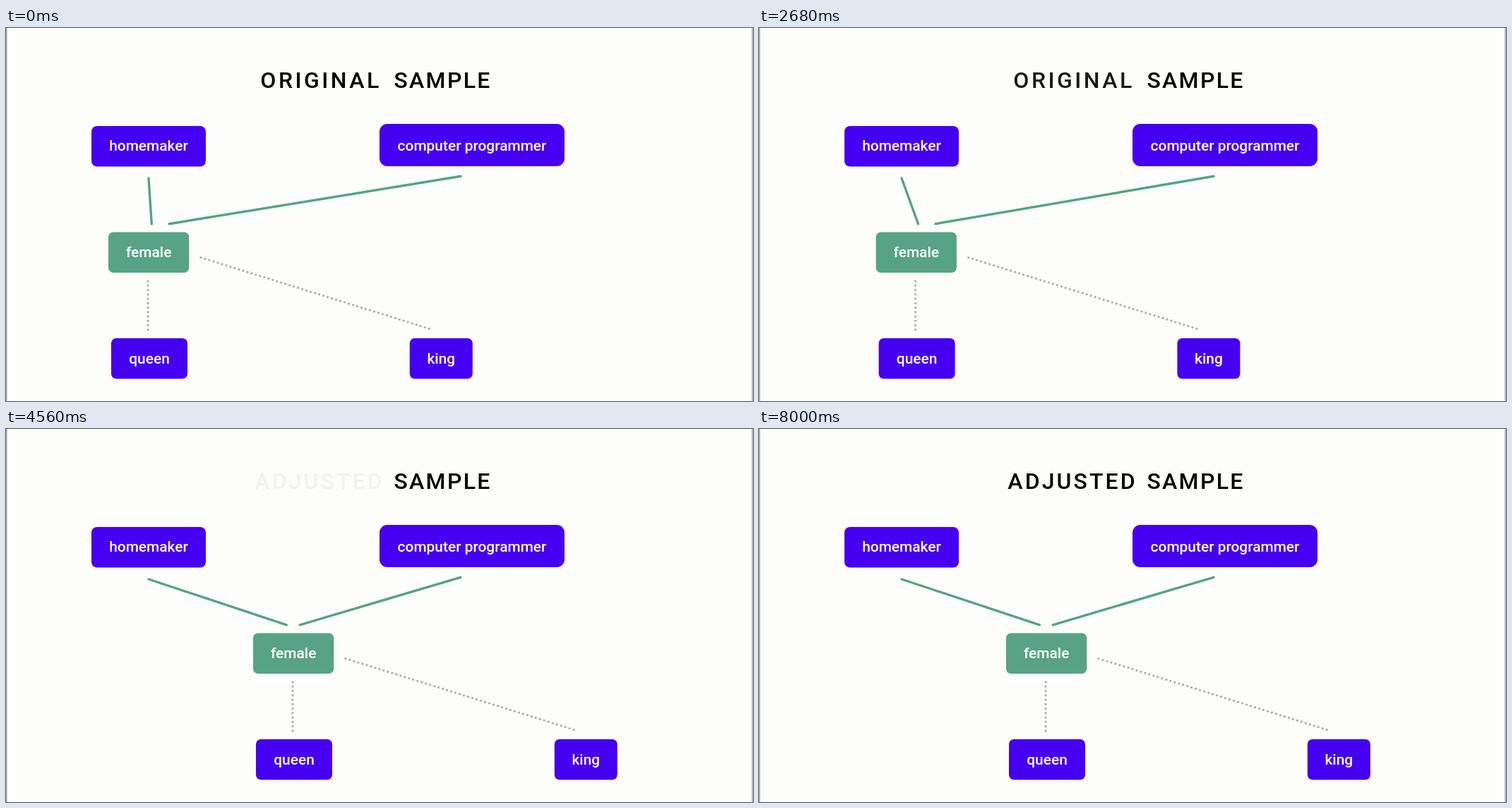
An HTML page for the animation above (9000 ms loop, 1058x529 px).

```html
<!DOCTYPE html>
<html lang="en">
<head>
<meta charset="utf-8">
<title>Sample adjustment</title>
<style>
  html, body { margin: 0; width: 100%; height: 100%; overflow: hidden; background: #fdfdfc; }
  svg { display: block; width: 100%; height: 100%; }
  text { font-family: Roboto, "Liberation Sans", sans-serif; font-weight: 500; }
  .title text { font-size: 32px; fill: #000; }
  .label { font-size: 20.9px; fill: #fff; text-anchor: middle; }
  line { stroke-linecap: round; }
  .solid line { stroke: #55a386; stroke-width: 3.4; }
  .halo line { stroke: #74f57c; stroke-width: 9; }
  .bright line { stroke: #50d583; stroke-width: 4; }
  .dots line { stroke: #aaa9a8; stroke-width: 3.2; stroke-dasharray: 0 6.27; }
</style>
</head>
<body>
<svg viewBox="0 0 1058 529" preserveAspectRatio="none">
  <defs>
    <filter id="blur" filterUnits="userSpaceOnUse" x="150" y="170" width="550" height="150">
      <feGaussianBlur stdDeviation="4.5"/>
    </filter>
  </defs>
  <rect width="1058" height="529" fill="#fdfdfc"/>
  <path d="M.8 0V529M1057 0V529" stroke="#aaa5b3" stroke-width="1.6"/>
  <g class="title">
    <text id="before" x="360.3" y="85" letter-spacing="3.5">ORIGINAL</text>
    <text id="after" x="352.3" y="85" letter-spacing="3.1">ADJUSTED</text>
    <text x="549.4" y="85" letter-spacing="2.3">SAMPLE</text>
  </g>
  <g class="solid links"></g>
  <g id="glow">
    <g class="halo links" filter="url(#blur)"></g>
    <g class="bright links"></g>
  </g>
  <g id="fixed"></g>
  <g id="moving">
    <g class="dots">
      <line x1="201" y1="359" x2="201" y2="428.5"/>
      <line x1="276" y1="325.5" x2="601.8" y2="427.2"/>
    </g>
  </g>
</svg>
<script>
const LOOP = 9000;
const SHIFT = 205;
const PURPLE = '#4500f1';
const GREEN = '#58a387';
const byId = id => document.getElementById(id);

function add(parent, tag, attrs, text = '') {
  const node = document.createElementNS('http://www.w3.org/2000/svg', tag);
  for (const key in attrs) node.setAttribute(key, attrs[key]);
  node.textContent = text;
  parent.append(node);
  return node;
}

function addBox(parent, text, x, y, width, height, rx, fill, baseline) {
  add(parent, 'rect', { x, y, width, height, rx, fill });
  add(parent, 'text', { class: 'label', x: x + width / 2, y: baseline }, text);
}

addBox(byId('fixed'), 'homemaker', 121, 139, 162, 57.5, 8, PURPLE, 174);
addBox(byId('fixed'), 'computer programmer', 529, 136, 262, 60, 11, PURPLE, 174);
addBox(byId('moving'), 'female', 145, 289.5, 114.3, 57.5, 7, GREEN, 325);
addBox(byId('moving'), 'queen', 149, 440, 108, 57.5, 7, PURPLE, 475.5);
addBox(byId('moving'), 'king', 571.8, 440, 89, 57.5, 7, PURPLE, 475.5);

// Each link has a fixed top end and a bottom end that slides from x to x + travel.
const links = [
  { top: [202, 213], x: 206.3, travel: 191 },
  { top: [644, 210.3], x: 231.3, travel: 185 }
];
const linkLines = [...document.querySelectorAll('.links')].flatMap(group =>
  links.map(link => ({
    link,
    node: add(group, 'line', { x1: link.top[0], y1: link.top[1], y2: 277.8 })
  })));

const ramp = (t, start, end) => Math.min(1, Math.max(0, (t - start) / (end - start)));
const pulse = (t, start, end) => {
  const p = ramp(t, start, end);
  return 1 - Math.abs(2 * p - 1);
};

function render(t) {
  const slide = ramp(t, 2480, 4480);
  byId('moving').setAttribute('transform', `translate(${SHIFT * slide} 0)`);
  for (const { link, node } of linkLines) node.setAttribute('x2', link.x + link.travel * slide);
  byId('before').setAttribute('opacity', 1 - slide);
  byId('after').setAttribute('opacity', ramp(t, 4480, 6480));
  byId('glow').setAttribute('opacity', pulse(t, 0, 2000) + pulse(t, 5000, 8000));
}

const began = performance.now();
function tick() {
  render((performance.now() - began) % LOOP);
  requestAnimationFrame(tick);
}
tick();
</script>
</body>
</html>
```
